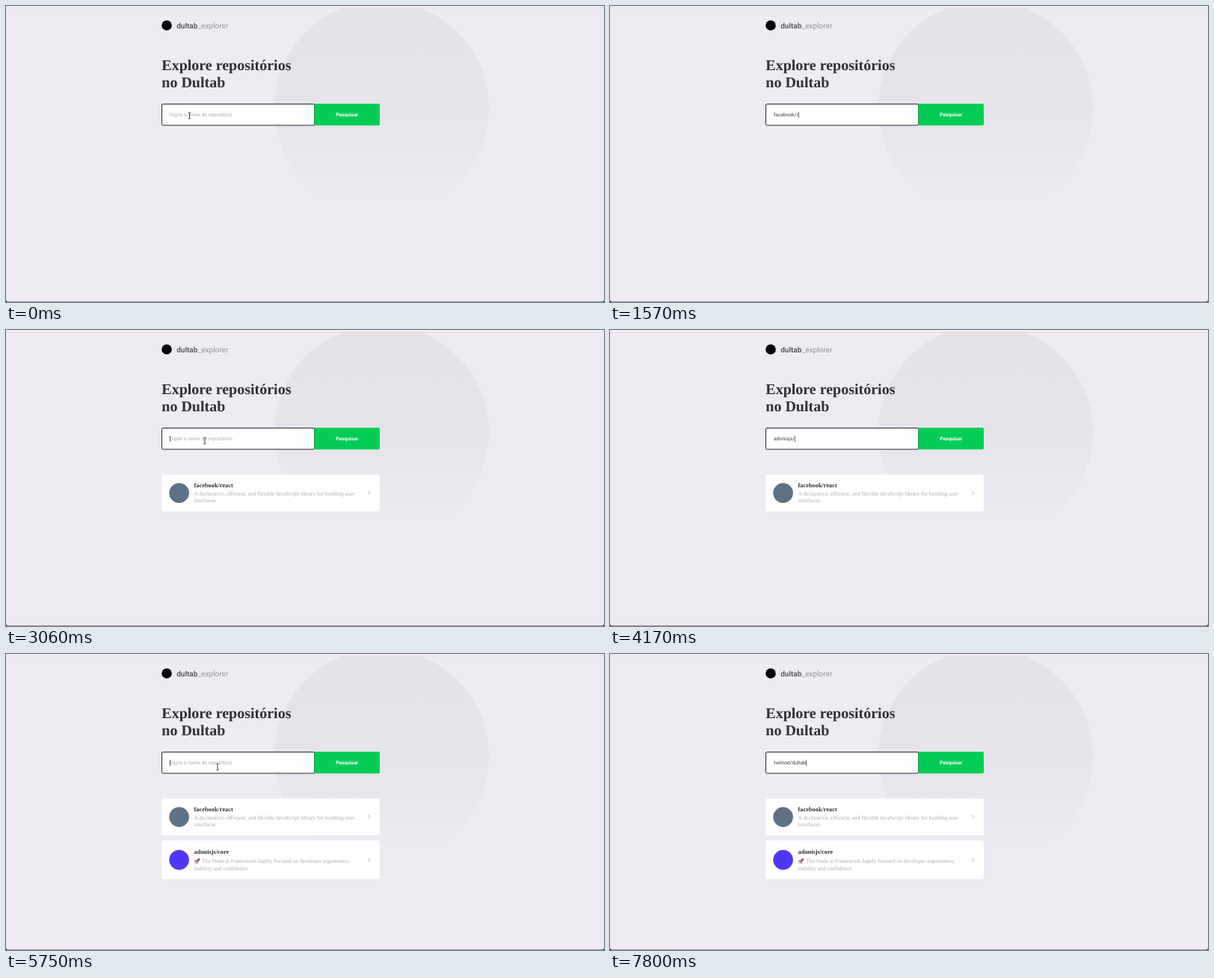
An HTML page that plays this animation: 800x397 px, repeating every 8000 ms.

```html
<!DOCTYPE html>
<html lang="pt-BR">
<head>
<meta charset="utf-8">
<title>Explorer</title>
<style>
  html, body { margin: 0; width: 100%; height: 100%; overflow: hidden; background: #eeebf2; }
  svg { display: block; width: 100vw; height: 100vh; }
  text { font-family: Roboto, sans-serif; text-rendering: geometricPrecision; white-space: pre; }
  .serif { font-family: "Liberation Serif", "Times New Roman", serif; }
  h1, .heading { font-size: 20px; font-weight: 700; fill: #312f37; }
  .brand { font-size: 10px; font-weight: 500; fill: #4b4a52; }
  .brand .light { font-weight: 400; fill: #96949c; }
  .field { font-size: 6.67px; fill: #3a3a3a; }
  .field.empty { fill: #a8a8b3; }
  .button { font-size: 6.67px; font-weight: 700; fill: #fff; }
  .title { font-size: 8.33px; font-weight: 700; fill: #302e37; }
  .about { font-size: 7.5px; fill: #aaa9b3; }
  .chevron { fill: none; stroke: #b9b8c2; stroke-width: 1; }
</style>
</head>
<body>
<svg viewBox="0 0 800 397" preserveAspectRatio="none">
  <defs>
    <linearGradient id="fade" gradientUnits="userSpaceOnUse" x1="0" y1="0" x2="0" y2="252">
      <stop offset="0" stop-color="#e3e2e7"/>
      <stop offset=".55" stop-color="#e6e4ea"/>
      <stop offset="1" stop-color="#edeaf1"/>
    </linearGradient>
    <clipPath id="band"><rect y="3" width="800" height="249"/></clipPath>
  </defs>

  <rect width="800" height="397" fill="#eeebf2"/>
  <circle cx="502.5" cy="136.5" r="143.5" fill="url(#fade)" clip-path="url(#band)"/>
  <rect width="800" height="2" fill="#f5f4f7"/>
  <rect y="2" width="800" height="1" fill="#dcdadf"/>
  <rect y="396.3" width="800" height=".7" fill="#77757b"/>
  <path d="M0 393.5Q0 397 3.5 397H0ZM800 393.5Q800 397 796.5 397H800Z" fill="#111"/>

  <circle cx="215" cy="26" r="6.8" fill="#050507"/>
  <text class="brand" y="29.8"><tspan x="228.2">dultab</tspan><tspan class="light" x="256.8">_explorer</tspan></text>
  <text class="serif heading" x="208.3" y="86">Explore repositórios</text>
  <text class="serif heading" x="208.3" y="109.3">no Dultab</text>

  <rect id="box" x="208.5" y="131.5" width="204" height="28.5" rx="1.5" fill="#fff" stroke-width="1"/>
  <path id="button" d="M412.3 131H498a2 2 0 0 1 2 2V158.3a2 2 0 0 1 -2 2H412.3Z"/>
  <text class="button" x="456.2" y="148.3" text-anchor="middle">Pesquisar</text>
  <text id="field" class="field" x="219" y="148.3"></text>
  <rect id="caret" y="142" width=".7" height="8" fill="#222"/>

  <g id="card1">
    <rect x="208.3" y="193.8" width="291.7" height="49.4" rx="2" fill="#fff"/>
    <circle cx="231.6" cy="218.6" r="13.3" fill="#5f7186"/>
    <text class="serif title" x="251.6" y="211.4">facebook/react</text>
    <text class="serif about" x="251.6" y="221.9">A declarative, efficient, and flexible JavaScript library for building user</text>
    <text class="serif about" x="251.6" y="231.2">interfaces.</text>
    <path class="chevron" d="M484.5 216l2.3 2.6l-2.3 2.6"/>
  </g>

  <g id="card2">
    <rect x="208.3" y="250" width="291.7" height="52" rx="2" fill="#fff"/>
    <circle cx="231.6" cy="276.1" r="13.3" fill="#4f38f5"/>
    <text class="serif title" x="251.6" y="267.8">adonisjs/core</text>
    <g transform="translate(255.7 277.8) rotate(45)">
      <path d="M-1.7 0L-3.3 2.8L-1 2.2ZM1.7 0L3.3 2.8L1 2.2Z" fill="#c8404c"/>
      <path d="M-1 2.2L0 5.4L1 2.2Z" fill="#f2a03a"/>
      <path d="M0 -5Q3.2 -2 1.4 2.4H-1.4Q-3.2 -2 0 -5Z" fill="#9aa1ad"/>
      <path d="M0 -5Q1.5 -3.8 1.8 -2.6H-1.8Q-1.5 -3.8 0 -5Z" fill="#c8404c"/>
      <circle cy="-.9" r=".9" fill="#3c4a66"/>
    </g>
    <text class="serif about" x="262.3" y="280">The Node.js Framework highly focused on developer ergonomics,</text>
    <text class="serif about" x="251.6" y="289.9">stability and confidence</text>
    <path class="chevron" d="M484.5 273.5l2.3 2.6l-2.3 2.6"/>
  </g>

  <g id="beam" fill="none">
    <path d="M-1.5 -4.3Q0 -4.3 0 -3.2Q0 -4.3 1.5 -4.3M0 -3.2V3.2M-1.5 4.3Q0 4.3 0 3.2Q0 4.3 1.5 4.3" stroke="#fff" stroke-width="1.8"/>
    <path d="M-1.5 -4.3Q0 -4.3 0 -3.2Q0 -4.3 1.5 -4.3M0 -3.2V3.2M-1.5 4.3Q0 4.3 0 3.2Q0 4.3 1.5 4.3" stroke="#222" stroke-width=".9"/>
  </g>
  <path id="hand" d="M-1.7 -3.6Q-.9 -4.3 -.4 -3.3L0 -1.3L2.3 -.8Q3.3 -.4 3.1 .7L2.5 3.8H-.9L-3.1 .9Q-3.2 -.1 -2.1 .3L-1.3 .9Z" fill="#fff" stroke="#222" stroke-width=".7"/>
</svg>
<script>
  const LOOP = 8000, TICK = 92.8;
  const PLACEHOLDER = 'Digite o nome do repositório';
  const $ = id => document.getElementById(id);
  const show = (id, on) => $(id).setAttribute('visibility', on ? 'visible' : 'hidden');

  // All times below are in ticks: one key time per typed character.
  const entries = [
    { text: 'facebook/react', keys: [5, 6, 7, 8, 9, 10, 11, 12, 14, 16, 17, 18, 19, 20], sent: 27, focus: -8 },
    { text: 'adonisjs/core', keys: [36, 37, 38, 39, 39, 40, 40, 41, 45, 46, 47, 47, 48], sent: 56, focus: 31 },
    { text: 'tvelnod/dultab', keys: [65, 66, 67, 68, 69, 70, 73, 75, 76, 77, 78, 80, 82, 84], sent: 99, focus: 60 }
  ];

  // Pointer trips: [tick, x, y]; the pointer is hidden while typing.
  const trips = [
    [[0, 245.5, 147], [4.5, 245.5, 147]],
    [[19, 262, 148], [21, 415, 149], [24, 427, 148.5], [28, 427, 148.5], [31, 269, 150], [33, 266, 148.5], [35.5, 266, 148.5]],
    [[51, 285, 149], [53, 425, 149], [54, 435, 148.5], [57, 435, 148.5], [59, 310, 150], [62, 283, 151.5], [64.5, 283, 151.5]]
  ];

  function pointerAt(n) {
    const trip = trips.find(p => n >= p[0][0] && n <= p[p.length - 1][0]);
    if (!trip) return null;
    const i = Math.max(1, trip.findIndex(p => p[0] >= n));
    const [t0, x0, y0] = trip[i - 1], [t1, x1, y1] = trip[i];
    const k = (n - t0) / (t1 - t0);
    return { x: x0 + (x1 - x0) * k, y: y0 + (y1 - y0) * k };
  }

  function draw(time) {
    const n = Math.floor((time + 6) / TICK);
    const entry = entries.find(e => n < e.sent);
    const pressed = entry.keys.filter(k => k <= n);
    const typed = entry.text.slice(0, pressed.length);
    const pointer = pointerAt(n);
    const hover = !!pointer && pointer.x > 412;
    const blurred = (n >= 26 && n < 31) || (n >= 55 && n < 60);
    const lastAction = pressed.length ? pressed[pressed.length - 1] : entry.focus;
    const blinkOn = Math.floor((n - lastAction) / 5) % 2 === 0;

    const field = $('field');
    field.textContent = typed || PLACEHOLDER;
    field.classList.toggle('empty', !typed);
    const caretX = 219.2 + (typed ? field.getComputedTextLength() : 0);
    $('caret').setAttribute('x', caretX);
    show('caret', blinkOn && !hover && !blurred);

    $('box').setAttribute('stroke', blurred ? '#fff' : '#26252a');
    $('button').setAttribute('fill', hover ? '#03a044' : '#04cd56');
    show('card1', n >= entries[0].sent);
    show('card2', n >= entries[1].sent);

    show('beam', pointer && !hover);
    show('hand', hover);
    if (pointer) {
      const place = `translate(${pointer.x} ${pointer.y})`;
      $('beam').setAttribute('transform', place);
      $('hand').setAttribute('transform', place);
    }
  }

  const start = performance.now();
  function loop() {
    draw((performance.now() - start) % LOOP);
    requestAnimationFrame(loop);
  }
  loop();
</script>
</body>
</html>
```
